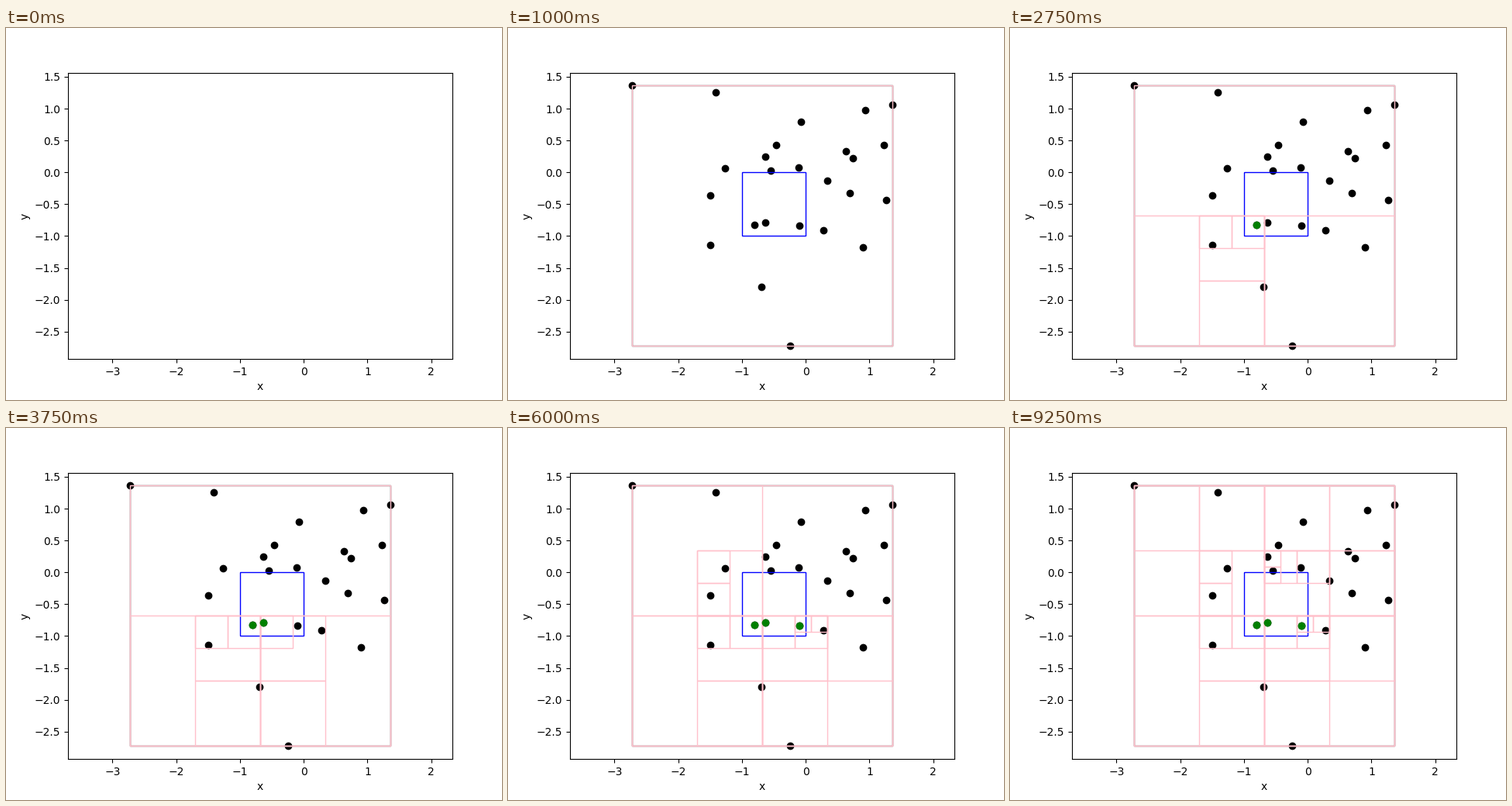
A matplotlib script that plays this animation: 640x480 px, repeating every 9.5 s.

```python
import matplotlib.pyplot as plt
from matplotlib.animation import FuncAnimation
from matplotlib.patches import Rectangle

FRAMES, INTERVAL = 38, 250
LO, HI = -2.726, 1.36
SIZE = HI - LO
SCALE = 336 / SIZE          # stage pixels per data unit
WINDOW = (-1, -1, 1)        # left, bottom, side

# The scattered sample, in stage pixels; the whole tree follows from it
DOTS = [
    (160, 74), (268, 83), (378, 121), (461, 106), (496, 99),
    (346, 151), (332, 166), (436, 159), (445, 168), (485, 151),
    (280, 181), (339, 184), (375, 180), (412, 197), (261, 216),
    (441, 213), (488, 222), (318, 254), (332, 251), (376, 255),
    (407, 261), (261, 280), (458, 283), (327, 334), (364, 410),
]


def to_data(px, py):
    return LO + (px + 0.2 - 160) / SCALE, HI - (py + 0.2 - 74.4) / SCALE


def overlaps(a, b):
    return all(a[i] < b[i] + b[2] and b[i] < a[i] + a[2] for i in (0, 1))


def contains(box, point):
    return all(box[i] <= point[i] <= box[i] + box[2] for i in (0, 1))


def search(box, points):
    """Walk the quadtree, yielding each visited cell and each hit."""
    yield "cell", box
    if len(points) == 1:
        if contains(WINDOW, points[0]):
            yield "hit", points[0]
        return
    if not overlaps(box, WINDOW):
        return
    x, y, side = box
    half = side / 2
    for top in (False, True):
        for right in (False, True):
            inside = [p for p in points
                      if (p[0] >= x + half) == right
                      and (p[1] >= y + half) == top]
            if inside:
                yield from search((x + half * right, y + half * top, half),
                                  inside)


fig, ax = plt.subplots(figsize=(6.4, 4.8), dpi=100)
mid = (LO + HI) / 2
ax.set_xlim(mid - 248 / SCALE, mid + 248 / SCALE)
ax.set_ylim(LO - 0.05 * SIZE, HI + 0.05 * SIZE)
ax.set_xlabel("x")
ax.set_ylabel("y")


def add_box(box, color):
    x, y, side = box
    return ax.add_patch(Rectangle((x, y), side, side, fill=False,
                                  edgecolor=color, linewidth=1))


points = [to_data(*dot) for dot in DOTS]
root = (LO, LO, SIZE)

# One artist is revealed per frame, in this order
steps = [
    ax.scatter(*zip(*points), color="black"),
    add_box(root, "0.17"),
    add_box(WINDOW, "blue"),
]
for kind, item in search(root, points):
    if kind == "cell":
        steps.append(add_box(item, "pink"))
    else:
        steps.append(ax.scatter(*item, color="green"))


def draw(frame):
    for i, artist in enumerate(steps):
        artist.set_visible(i < frame)
    return steps


anim = FuncAnimation(fig, draw, frames=FRAMES, interval=INTERVAL,
                     init_func=lambda: draw(0), repeat=True, repeat_delay=0)
plt.show()
```
